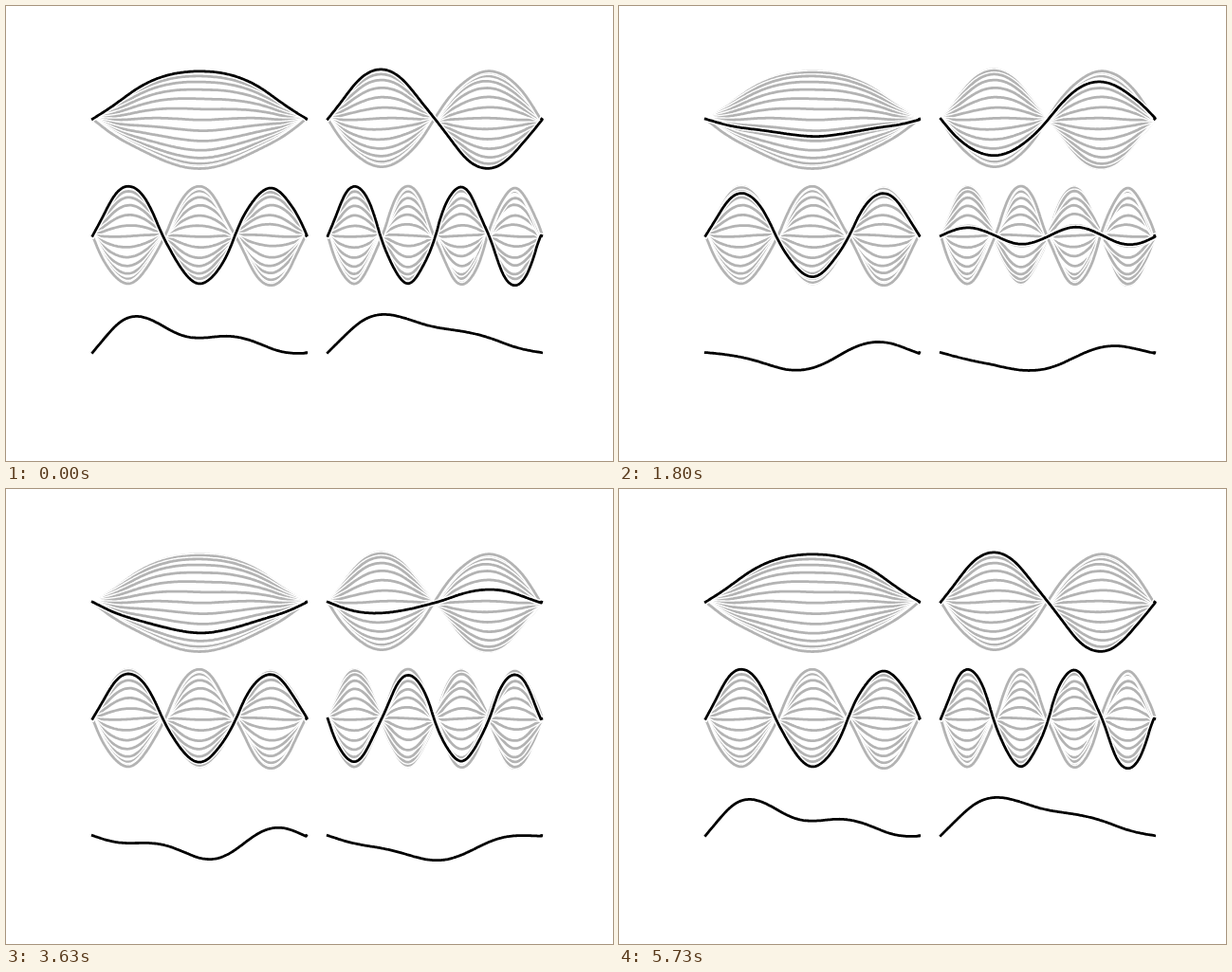
These frames come from a looping animation (640 px wide and 480 px high, 5.83 s). An HTML page with a canvas:

```html
<!DOCTYPE html>
<html>
<head>
<meta charset="utf-8">
<title>Standing waves</title>
<style>
html, body { margin: 0; width: 100%; height: 100%; overflow: hidden; background: #fff; }
canvas { display: block; }
</style>
</head>
<body>
<canvas id="stage" width="640" height="480"></canvas>
<script>
const ctx = document.getElementById('stage').getContext('2d');
const LOOP = 5830, WIDTH = 225.45, AMP = 51.33, SAMPLES = 1000;
const panels = [
  { modes: [1], trace: true },
  { modes: [0, 1], trace: true },
  { modes: [0, 0, 1], trace: true },
  { modes: [0, 0, 0, 1], trace: true },
  { modes: [1, 2, 3, 4].map(n => 0.48 / n) },
  { modes: [0.645, 0.235, 0.1, 0.04] }
];
panels.forEach((p, i) => {
  p.x = 91.27 + 248 * (i % 2);
  p.y = 119.2 + 123.2 * Math.floor(i / 2);
});

// Merge nearly straight runs; the end point is repeated.
function simplify(points) {
  let start = points[0], last = start, dir = null;
  const out = [start];
  for (const p of points.slice(1)) {
    if (!dir) dir = [p[0] - start[0], p[1] - start[1]];
    const cross = dir[0] * (p[1] - start[1]) - dir[1] * (p[0] - start[0]);
    if (Math.abs(cross) / Math.hypot(...dir) >= 1 / 9) {
      out.push(last);
      start = last;
      dir = [p[0] - start[0], p[1] - start[1]];
    }
    last = p;
  }
  out.push(last, last);
  return out;
}

// Hand-drawn wobble: shift each step sideways by a sine of random pace.
function sketch(points) {
  const path = new Path2D();
  let seed = 0, phase = 0, [lx, ly] = points[0];
  path.moveTo(lx, ly);
  function step(x, y) {
    seed = (Math.imul(214013, seed) + 2531011) >>> 0;
    phase += 2 ** (2 * seed / 2 ** 32 - 1);
    const r = Math.sin(phase * Math.PI / 50);
    const dx = x - lx, dy = y - ly, len = Math.hypot(dx, dy);
    lx = x;
    ly = y;
    if (len) path.lineTo(x - r * dy / len, y + r * dx / len);
    else path.lineTo(x, y);
  }
  for (let i = 1; i < points.length; i++) {
    const [x0, y0] = points[i - 1], [x1, y1] = points[i];
    const len = Math.hypot(x1 - x0, y1 - y0);
    for (let k = 1; k < len - 1; k++) {
      step(x0 + (x1 - x0) * k / len, y0 + (y1 - y0) * k / len);
    }
    step(x1, y1);
  }
  return path;
}

function wave(panel, weights) {
  const points = Array.from({ length: SAMPLES }, (_, i) => {
    const u = i / (SAMPLES - 1);
    const v = weights.reduce((sum, w, n) => sum + w * Math.sin((n + 1) * Math.PI * u), 0);
    return [panel.x + WIDTH * u, panel.y - AMP * v];
  });
  return sketch(simplify(points));
}

function stroke(path, color) {
  ctx.lineWidth = 5.56;
  ctx.strokeStyle = '#fff';
  ctx.stroke(path);
  ctx.lineWidth = 2.78;
  ctx.strokeStyle = color;
  ctx.stroke(path);
}

const traces = [];
for (const p of panels.filter(p => p.trace)) {
  for (let k = 0; k < 15; k++) {
    const a = Math.cos(Math.PI * k / 14);
    traces.push(wave(p, p.modes.map(m => m * a)));
  }
}

// The turning point is held only briefly.
function tickAt(t) {
  return t < 2930 ? Math.min(29, Math.floor(t / 100)) : 31 + Math.floor((t - 2930) / 100);
}

function draw(tick) {
  const phase = 2 * Math.PI * tick / 59;
  ctx.fillStyle = '#fff';
  ctx.fillRect(0, 0, 640, 480);
  ctx.lineCap = 'square';
  ctx.lineJoin = 'round';
  for (const path of traces) stroke(path, '#b3b3b3');
  for (const p of panels) {
    stroke(wave(p, p.modes.map((m, n) => m * Math.cos((n + 1) * phase))), '#000');
  }
}

const begin = performance.now();
let shown = -1;
function loop() {
  const tick = tickAt((performance.now() - begin) % LOOP);
  if (tick !== shown) draw(shown = tick);
  requestAnimationFrame(loop);
}
loop();
</script>
</body>
</html>
```
